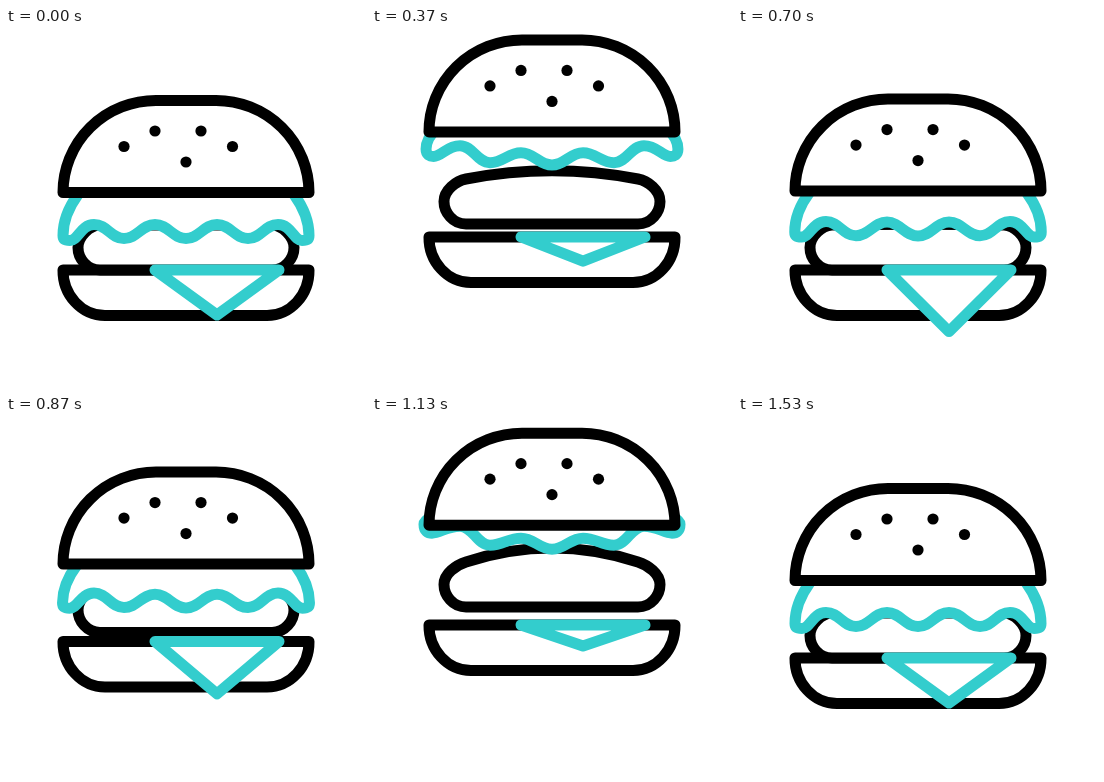
An HTML page for the animation above (2 s loop, 360 by 360 pixels).

```html
<!DOCTYPE html>
<html lang="en">
<head>
<meta charset="utf-8">
<title>Bouncing burger</title>
<style>
  html, body { margin: 0; width: 100%; height: 100%; overflow: hidden; background: #fff; }
  svg { display: block; width: 100vw; height: 100vh; }
  path { fill: #fff; stroke: #000; stroke-width: 11; stroke-linejoin: round; stroke-linecap: round; }
  .teal { stroke: #33cdcd; }
</style>
</head>
<body>
<svg viewBox="0 0 360 360">
  <path id="bottom" d="M57 0H303A42 45 0 0 1 261 45.5H99A42 45 0 0 1 57 0Z"/>
  <path id="patty"/>
  <path id="cheese" class="teal"/>
  <path id="lettuce" class="teal"/>
  <g id="top">
    <path d="M57 0A93 92 0 0 1 150 -92H210A93 92 0 0 1 303 0Z"/>
    <circle cx="118" cy="-46" r="5.6"/>
    <circle cx="149" cy="-61.5" r="5.6"/>
    <circle cx="195" cy="-61.5" r="5.6"/>
    <circle cx="226.5" cy="-46" r="5.6"/>
    <circle cx="180" cy="-30.5" r="5.6"/>
  </g>
</svg>
<script>
const LOOP = 2000, STEP = 100 / 3;

const el = id => document.getElementById(id);
const mix = (a, b, k) => a + (b - a) * k;

function ease(t, from, to) {
  const k = Math.min(1, Math.max(0, (t - from) / (to - from)));
  return (1 - Math.cos(Math.PI * k)) / 2;
}

// Goes 0 -> 1 -> 0: leaves at start, peaks at apex, falls from drop to end.
const hop = (t, start, apex, end, drop = apex) => ease(t, start, apex) - ease(t, drop, end);

function pose(t) {
  const rebound = hop(t, 733, 1000, 1400, 1133);
  const curl = hop(t, 200, 500, 733);
  return {
    top: 164.5 - 61.5 * hop(t, 67, 335, 740) - 55.5 * hop(t, 720, 1120, 1533),
    bottom: 242 - 33 * (hop(t, 67, 333, 667, 400) + rebound),
    patty: 242 - 46 * hop(t, 67, 333, 680, 410) - 51 * rebound,
    tip: 45 - 24 * (hop(t, 100, 450, 733) + hop(t, 733, 1133, 1533)) + 18 * hop(t, 450, 733, 1133),
    edge: curl + hop(t, 800, 1133, 1533),
    wave: curl + hop(t, 800, 1133, 1400)
  };
}

function pattyPath(base, bulge) {
  const mid = base - 22.5, top = base - 45, lean = top + bulge * 0.23;
  return `M94 ${base}C81 ${base} 72 ${mid + 11} 72 ${mid}` +
    `C72 ${mid - 11} 84 ${lean} 94 ${top}Q180 ${top - 2 * bulge} 266 ${top}` +
    `C276 ${lean} 288 ${mid - 11} 288 ${mid}C288 ${mid + 11} 279 ${base} 266 ${base}Z`;
}

// The left half is built up to the centre trough, then mirrored.
function lettucePath(base, edge, wave) {
  const x = mix(57, 52, edge), side = base + mix(43, -1, edge);
  const lobeX = mix(64, 60, edge), lobe = base + mix(48, 8, edge);
  const startX = mix(72, 60, edge), start = base + mix(2, -8, edge);
  const crest = base + mix(32, 1, (edge + wave) / 2);
  const pts = [
    [startX, start], [mix(startX, x, 0.6), mix(start, side, 0.3)], [x, mix(start, side, 0.65)], [x, side],
    [x, mix(side, lobe, 0.8)], [lobeX - 4, lobe], [lobeX, lobe],
    [lobeX + 8, lobe], [75, crest], [88, crest]
  ];
  for (let i = 1; i <= 3; i++) {
    const [px, py] = pts[pts.length - 1];
    const trough = i % 2, hx = 87 + 31 * i;
    const hy = base + mix(32 + 14 * trough, 9 + 9 * trough + 2 * i, wave);
    pts.push([px + 13, py], [hx - 13, hy], [hx, hy]);
  }
  const mirror = pts.slice(0, -1).reverse().map(([mx, my]) => [360 - mx, my]);
  return "M" + pts[0] + "C" + pts.slice(1).concat(mirror).join(" ");
}

function draw(ms) {
  const t = Math.floor((ms % LOOP + 3.5) / STEP) * STEP;
  const p = pose(t);
  el("top").setAttribute("transform", `translate(0 ${p.top})`);
  el("bottom").setAttribute("transform", `translate(0 ${p.bottom})`);
  el("patty").setAttribute("d", pattyPath(p.patty, 14 * p.wave));
  el("cheese").setAttribute("d", `M149 ${p.bottom}H273L211 ${p.bottom + p.tip}Z`);
  el("lettuce").setAttribute("d", lettucePath(p.top, p.edge, p.wave));
}

const start = performance.now();
function tick() {
  draw(performance.now() - start);
  requestAnimationFrame(tick);
}
tick();
</script>
</body>
</html>
```
